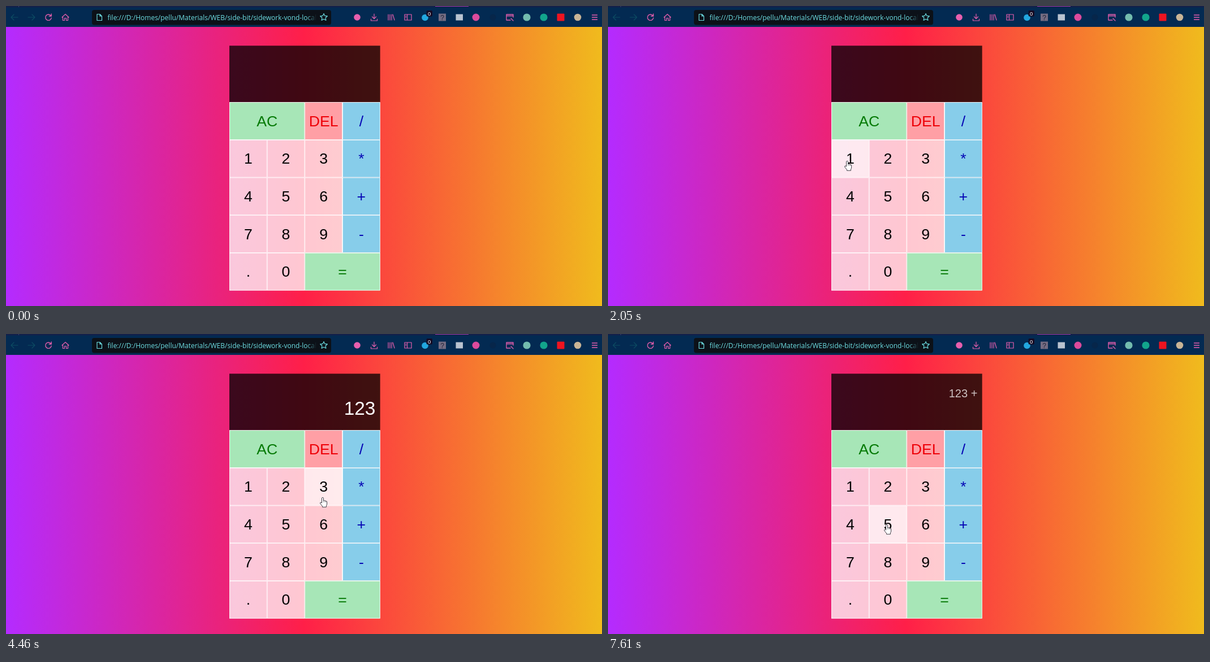
An HTML page with a canvas for the animation above (8 s loop, 1054 by 531 pixels).

```html
<!DOCTYPE html>
<html lang="en">
<head>
<meta charset="utf-8">
<title>Calculator</title>
<style>
  html, body { margin: 0; width: 100%; height: 100%; overflow: hidden; background: #032a52; }
  canvas { display: block; }
</style>
</head>
<body>
<canvas id="stage" width="1054" height="531"></canvas>
<script>
const ctx = document.getElementById('stage').getContext('2d');
const LOOP = 8000;
const PINK = '#e85fae', CYAN = '#6cdde2', DIM = '#0d4c62';

// The page is laid out in CSS pixels shown at 5/6 size
const PX = 5 / 6;
const CELL = 80 * PX, LEFT = 395, TOP = 70.2, KEYS_TOP = TOP + 120 * PX;
const RIGHT = LEFT + 4 * CELL;
const BASELINE = 0.3465; // below the middle of a line, in ems

// Fill colours: [resting, pressed, hovered]
const STYLES = {
  digit: { fill: ['rgba(255,255,255,.75)', 'rgba(255,255,255,.83)', 'rgba(255,255,255,.9)'], ink: '#000' },
  operator: { fill: ['#87cdea', '#69ccf5', '#4bcafe'], ink: '#0505b4' },
  green: { fill: ['#a7e6b7', '#98eaae', '#8aeea6'], ink: '#067a06' },
  red: { fill: ['#ff9fa5', '#ff8f96', '#ff8088'], ink: '#ee0008' }
};

const buttons = [];
function addButton(label, col, row, style, span = 1) {
  buttons.push({ label, style: STYLES[style], x: LEFT + col * CELL, y: KEYS_TOP + row * CELL,
    w: span * CELL, h: CELL });
}
addButton('AC', 0, 0, 'green', 2);
addButton('DEL', 2, 0, 'red');
[...'123456789'].forEach((d, i) => addButton(d, i % 3, 1 + Math.floor(i / 3), 'digit'));
[...'/*+-'].forEach((op, i) => addButton(op, 3, i, 'operator'));
addButton('.', 0, 4, 'digit');
addButton('0', 1, 4, 'digit');
addButton('=', 2, 4, 'green', 2);

const hovers = [[0, ''], [1270, '9'], [1850, 'AC'], [1980, '1'], [3050, '2'], [3970, '3'],
  [5100, '+'], [7410, '6'], [7540, '5']];
const presses = [[0, ''], [2450, '1'], [2580, ''], [3220, '2'], [3360, ''], [4310, '3'], [4460, ''],
  [5830, '+'], [6290, '']];
const readouts = [[0, '', ''], [2580, '', '1'], [3360, '', '12'], [4460, '', '123'], [6290, '123 +', '']];
const ripples = [[2390, 2450], [3050, 3220], [3970, 4040], [5430, 5560]];

// Pointer moves: start, end, number of jumps, destination
const moves = [
  [530, 530, 1, 993, 525], [590, 650, 2, 1012, 521],
  [850, 1110, 4, 438, 242], [1270, 1340, 2, 434, 224],
  [1410, 1710, 5, 416, 267], [1790, 2050, 4, 423, 274],
  [2840, 2910, 2, 493, 270], [3620, 4040, 7, 560, 289],
  [4640, 5100, 5, 634, 322], [7200, 7610, 7, 493, 337]
];

const latest = (list, t) => list.filter(item => item[0] <= t).pop();

function pointerAt(t) {
  let x = 993, y = 525, shown = false;
  for (const [start, end, jumps, toX, toY] of moves) {
    if (t < start) break;
    shown = true;
    const gap = (end - start) / Math.max(1, jumps - 1);
    const part = gap ? Math.min(1, (Math.floor((t - start) / gap + 1e-6) + 1) / jumps) : 1;
    x += (toX - x) * part;
    y += (toY - y) * part;
  }
  return { x, y, shown };
}

function rect(x, y, w, h, color, radius = 0) {
  ctx.fillStyle = color;
  ctx.beginPath();
  ctx.roundRect(x, y, w, h, radius);
  ctx.fill();
}

function disc(x, y, r, color) {
  ctx.fillStyle = color;
  ctx.beginPath();
  ctx.arc(x, y, r, 0, Math.PI * 2);
  ctx.fill();
}

function text(str, x, y, size, color, align = 'center', family = 'Arial, "Liberation Sans", sans-serif') {
  ctx.font = `${size}px ${family}`;
  ctx.fillStyle = color;
  ctx.textAlign = align;
  ctx.fillText(str, x, y);
}

function icon(path, x, y, color, width = 1.2) {
  ctx.save();
  ctx.translate(x, y);
  ctx.strokeStyle = color;
  ctx.lineWidth = width;
  ctx.lineJoin = ctx.lineCap = 'round';
  ctx.stroke(new Path2D(path));
  ctx.restore();
}

function starPath(r) {
  const points = Array.from({ length: 10 }, (_, i) => {
    const a = i * Math.PI / 5 - Math.PI / 2, d = i % 2 ? r * 0.48 : r;
    return `${d * Math.cos(a)} ${d * Math.sin(a)}`;
  });
  return `M${points.join('L')}Z`;
}

function drawAddressBar() {
  rect(152, 7, 423, 26.5, '#0c1118', 4);
  icon('M-4 -5.5H1L4.5 -2V5.5H-4ZM1 -5.5V-2H4.5', 165, 20, CYAN);
  icon(starPath(6.6), 562, 20, CYAN);
  ctx.save();
  ctx.beginPath();
  ctx.rect(178, 8, 370, 24);
  ctx.clip();
  const fade = ctx.createLinearGradient(532, 0, 549, 0);
  fade.addColorStop(0, CYAN);
  fade.addColorStop(1, 'rgba(108,221,226,0)');
  text('file:///D:/Homes/pellu/Materials/WEB/side-bit/sidework-vond-local/calc', 179.5, 24.5, 12, fade, 'left',
    '"Open Sans", "Noto Sans", sans-serif');
  ctx.restore();
}

function drawToolbar() {
  rect(0, 0, 1054, 37, '#032a52');
  rect(0, 0, 1054, 2.5, '#12204a');
  rect(22, 0, 1, 2, '#3a426c');
  rect(759, 0, 59, 1, '#a03fae');
  icon('M6 0H-6M-1 -5L-6 0L-1 5', 15, 20, DIM);
  icon('M-6 0H6M1 -5L6 0L1 5', 45, 20, DIM);
  icon('M4.6 -2.4A5.2 5.2 0 1 0 5.2 1M5.2 -6V-2H1.2', 75, 20, PINK, 1.4);
  icon('M-6 0L0 -5.5L6 0M-4.5 -1V5.5H-1.5V1.5H1.5V5.5H4.5V-1', 105, 20, PINK);
  drawAddressBar();

  disc(621, 20, 5.8, PINK);
  icon('M0 -6V2.5M-3.5 -1L0 2.5L3.5 -1M-5.5 3V6H5.5V3', 651, 20, PINK);
  icon('M-5 -5V5M-2 -5V5M1 -5V5M3 -5L6 5', 681, 20, PINK);
  icon('M-6 -5H6V5H-6ZM-1.5 -5V5M-4.3 -2H-3.3M-4.3 0H-3.3', 711, 20, PINK);
  disc(741, 20.5, 5.8, '#22a7df');
  rect(743.5, 8, 10.5, 10.5, '#160b24', 2);
  text('0', 748.7, 16.5, 9.5, '#fff');
  rect(765, 13.5, 13, 13, '#746c82');
  text('?', 771.5, 24.5, 12, '#202438');
  rect(795.5, 14.5, 12.5, 11, '#b9c3d0');
  disc(831, 20, 6.5, '#dd4a9c');
  disc(861, 20, 5.5, '#07264a');
  icon('M1 5H-6V-5H6V0M-6 -2.5H6M2 2L6 6', 891, 20, PINK, 1.3);
  disc(921, 20, 6.6, '#73bcae');
  disc(951, 20, 6.6, '#12a58c');
  rect(974.5, 13.5, 13, 13, '#ee1420', 1);
  disc(1011, 20, 6.3, '#c9b596');
  icon('M-4.5 -4H4.5M-4.5 0H4.5M-4.5 4H4.5', 1041, 20, PINK, 1.3);
}

function drawBackdrop() {
  const sweep = ctx.createLinearGradient(0, 0, 1054, 0);
  sweep.addColorStop(0, '#b42bff');
  sweep.addColorStop(0.5, '#ff1f48');
  sweep.addColorStop(1, '#f0bb1d');
  rect(0, 37, 1054, 494, sweep);
}

function drawDisplay(t) {
  const [, previous, current] = latest(readouts, t);
  const edge = RIGHT - 10 * PX, small = 24 * PX, large = 40 * PX;
  rect(LEFT, TOP, 4 * CELL, 120 * PX, 'rgba(0,0,0,.75)');
  text(previous, edge, TOP + 42 * PX + BASELINE * small, small, 'rgba(255,255,255,.75)', 'right');
  text(current, edge, TOP + 73.75 * PX + BASELINE * large, large, '#fff', 'right');
}

function drawButtons(t) {
  const hovered = latest(hovers, t)[1], pressed = latest(presses, t)[1];
  const size = 32 * PX;
  ctx.strokeStyle = '#fff';
  ctx.lineWidth = PX;
  for (const { label, style, x, y, w, h } of buttons) {
    const state = label === pressed ? 1 : label === hovered ? 2 : 0;
    rect(x, y, w, h, style.fill[state]);
    ctx.strokeRect(x + PX / 2, y + PX / 2, w - PX, h - PX);
    text(label, x + w / 2, y + h / 2 + BASELINE * size, size, style.ink);
  }
}

const HAND = new Path2D('M-1.5 10V1.2Q0 -.8 1.5 1.2V6Q3 5 4 6.4Q5.2 5.6 6 7Q7.5 6.6 7.6 8.2V12' +
  'Q7.4 14 6.4 15V17.3H-.5V15.8L-4.3 11Q-4.8 8.8 -3 9Z');
const HAND_LINES = new Path2D('M1.5 6V9M4 6.6V9M6 7.2V9');
const ARROW = new Path2D('M0 0V15L3.5 11.8L6 17L8.2 16L5.8 11H10.5Z');

function drawPointer(t) {
  const { x, y, shown } = pointerAt(t);
  if (!shown) return;
  if (ripples.some(([on, off]) => t >= on && t < off)) disc(x, y, 10, 'rgba(162,218,84,.82)');
  const overButton = buttons.some(b => x > b.x && x < b.x + b.w && y > b.y && y < b.y + b.h);
  ctx.save();
  ctx.translate(x, y);
  ctx.fillStyle = '#fff';
  ctx.strokeStyle = '#2c2c36';
  ctx.lineWidth = 0.9;
  ctx.lineJoin = 'round';
  const shape = overButton ? HAND : ARROW;
  ctx.fill(shape);
  ctx.stroke(shape);
  if (overButton) {
    ctx.lineWidth = 0.5;
    ctx.stroke(HAND_LINES);
  }
  ctx.restore();
}

const began = performance.now();
function frame() {
  const t = (performance.now() - began) % LOOP;
  drawBackdrop();
  drawToolbar();
  drawDisplay(t);
  drawButtons(t);
  drawPointer(t);
  requestAnimationFrame(frame);
}
frame();
</script>
</body>
</html>
```
